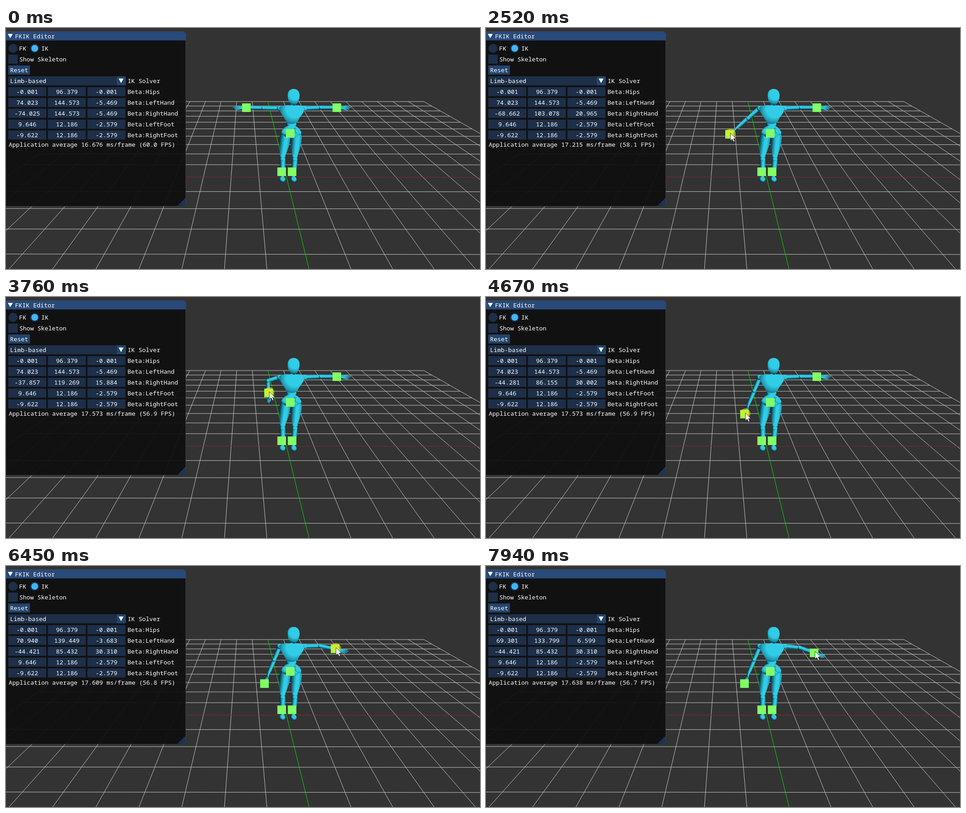
Recreate the animation shown at these times as an HTML page with a canvas. Size 1048x534 px, loop 8 s.

```html
<!DOCTYPE html>
<html lang="en">
<head>
<meta charset="utf-8">
<title>FKIK Editor</title>
<style>
  html, body { margin: 0; width: 100%; height: 100%; overflow: hidden; background: #333; }
  canvas { display: block; }
</style>
</head>
<body>
<canvas id="stage" width="1048" height="534"></canvas>
<script>
const ctx = document.getElementById('stage').getContext('2d');
const LOOP = 8000, STEP = 70, PHASE = 50;
const GREEN = '#80ff66', FIELD = '#1d2f49', BUTTON = '#23456d';
const LIT = '#31cde6', MID = '#1c93aa', DARK = '#06262e';

// Each hand rests, then eases from pose to pose; sag bows the path downwards
const RIGHT = {
  rest: [-74.025, 144.573, -5.469],
  grabbed: [1850, 4950],
  moves: [
    { start: 1850, end: 2500, pose: [-68.662, 103.078, 20.965], sag: 0 },
    { start: 2570, end: 3760, pose: [-37.857, 119.269, 15.884], sag: 13 },
    { start: 3830, end: 4750, pose: [-44.421, 85.432, 30.31], sag: 0 }
  ]
};
const LEFT = {
  rest: [74.023, 144.573, -5.469],
  grabbed: [6150, 7870],
  moves: [
    { start: 6150, end: 7190, pose: [55.586, 126.994, 5.214], sag: 3 },
    { start: 7260, end: 7870, pose: [69.301, 133.799, 6.599], sag: 0 }
  ]
};

const clamp = u => Math.min(1, Math.max(0, u));
const progress = (t, start, end) => clamp((t - start) / (end - start));
const ease = u => u * u * (3 - 2 * u);
const mix = (a, b, u) => a.map((v, i) => v + (b[i] - v) * u);
const project = ([x, y, z]) => [631.5 + 1.355 * x, 378.3 - 1.394 * y + 0.058 * z];

function handAt(hand, t) {
  return hand.moves.reduce((from, { start, end, pose, sag }) => {
    const u = progress(t, start, end);
    const value = mix(from, pose, ease(u));
    value[1] -= sag * Math.sin(Math.PI * u);
    return value;
  }, hand.rest);
}

// Frame time creeps up, with one short slowdown
const frameTime = t => 16.676 + 0.897 * clamp(t / 3760) ** 1.25
  + 1.04 * Math.exp(-(((t - 7190) / 420) ** 2));

function line(x0, y0, x1, y1, color) {
  ctx.strokeStyle = color;
  ctx.lineWidth = 1;
  ctx.beginPath();
  ctx.moveTo(x0, y0);
  ctx.lineTo(x1, y1);
  ctx.stroke();
}

function rect(x, y, w, h, color) {
  ctx.fillStyle = color;
  ctx.fillRect(x, y, w, h);
}

function polygon(color, ...points) {
  ctx.fillStyle = color;
  ctx.beginPath();
  points.forEach(([x, y]) => ctx.lineTo(x, y));
  ctx.closePath();
  ctx.fill();
}

function disc(x, y, r, color) {
  ctx.fillStyle = color;
  ctx.beginPath();
  ctx.arc(x, y, r, 0, 7);
  ctx.fill();
}

function text(value, x, y, align = 'left') {
  ctx.font = '13.35px "Noto Sans Mono", monospace';
  ctx.textAlign = align;
  ctx.fillStyle = '#fff';
  ctx.fillText(value, x, y + 4.5);
}

function drawGrid() {
  const far = 163, near = 534, white = '#c9c9c9';
  const columnX = (k, y) => {
    const top = 579 + 34.5 * k, bottom = 670 + 93 * k - 0.25 * k * k;
    return top + (bottom - top) * (y - far) / (near - far);
  };
  const rowY = n => 5020 / (13.02 - n) - 55.1;
  const column = (k, color) => line(columnX(k, far), far, columnX(k, near), near, color);
  const row = (n, color) => {
    const y = rowY(n), tilt = (y - far) / 400;
    line(columnX(-10, y), y - tilt, columnX(10, y), y + tilt, color);
  };
  for (let k = -10; k <= 10; k++) if (k) column(k, white);
  for (let n = -10; n <= 4; n++) if (n) row(n, white);
  row(0, '#802a2a');
  column(0, '#00e800');
}

function solid(path, x, y, r) {
  const g = ctx.createRadialGradient(x, y, 0, x, y, r);
  g.addColorStop(0, LIT);
  g.addColorStop(0.45, LIT);
  g.addColorStop(0.75, MID);
  g.addColorStop(1, DARK);
  ctx.fillStyle = g;
  ctx.fill(path);
}

function ball(x, y, rx, ry = rx, tilt = 0) {
  const path = new Path2D();
  path.ellipse(x, y, rx, ry, tilt, 0, 7);
  solid(path, x + rx * 0.3, y - ry * 0.35, Math.max(rx, ry) * 1.35);
}

// Tapered segment, lit from the upper right
function limb([x0, y0], [x1, y1], r0, r1) {
  const angle = Math.atan2(y1 - y0, x1 - x0), length = Math.hypot(x1 - x0, y1 - y0);
  const lit = Math.max(r0, r1) * (0.55 * Math.sin(angle) + 0.83 * Math.cos(angle) >= 0 ? -1 : 1);
  ctx.save();
  ctx.translate(x0, y0);
  ctx.rotate(angle);
  const g = ctx.createLinearGradient(0, lit, 0, -lit);
  g.addColorStop(0, MID);
  g.addColorStop(0.25, LIT);
  g.addColorStop(0.5, LIT);
  g.addColorStop(0.7, MID);
  g.addColorStop(1, DARK);
  ctx.fillStyle = g;
  ctx.beginPath();
  ctx.arc(0, 0, r0, Math.PI / 2, Math.PI * 1.5);
  ctx.quadraticCurveTo(length * 0.4, -r0 * 1.1, length, -r1);
  ctx.arc(length, 0, r1, -Math.PI / 2, Math.PI / 2);
  ctx.quadraticCurveTo(length * 0.4, r0 * 1.1, 0, r0);
  ctx.fill();
  ctx.restore();
}

function drawHand([x, y], angle, length, side) {
  const at = (d, a) => [x + d * Math.cos(angle + a * side), y + d * Math.sin(angle + a * side)];
  limb([x, y], at(length * 0.5, 0), 2.6, 2.8);
  for (let finger = -1; finger <= 2; finger++) {
    const spread = 0.12 * finger;
    limb(at(length * 0.35, spread), at(length * (1 - 0.1 * Math.abs(finger)), spread), 1.5, 0.7);
  }
}

// Two bones; the bend grows as the hand comes nearer
function drawArm(shoulder, value, side) {
  const bone = 36.5, target = project(value), depth = Math.max(value[2], 0);
  const dx = target[0] - shoulder[0], dy = target[1] - shoulder[1], distance = Math.hypot(dx, dy);
  const reach = Math.min(distance, 73 - depth * 0.25);
  const ux = dx / distance, uy = dy / distance;
  const slack = 1 - (distance / (2 * bone)) ** 2;
  const bend = Math.max(slack, 0) * bone * 0.7 * side;
  const elbow = [shoulder[0] + ux * reach / 2 + uy * bend, shoulder[1] + uy * reach / 2 - ux * bend];
  const wrist = [shoulder[0] + ux * reach, shoulder[1] + uy * reach];
  limb(shoulder, elbow, 5, 3.8);
  limb(elbow, wrist, 4.6, 2.6);
  ball(...elbow, 3.8);
  drawHand(wrist, Math.atan2(wrist[1] - elbow[1], wrist[0] - elbow[0]), 30 - depth * 0.5, side);
  ball(...shoulder, 6);
}

function drawLeg(side) {
  const hip = [629.5 + 12.5 * side, 242], knee = [625 + 13.5 * side, 284], ankle = [623.5 + 12 * side, 328];
  limb([knee[0], 291], ankle, 6, 3.8);
  ball(623.5 + 12.5 * side, 335.5, 6.5);
  limb(hip, knee, 12, 5);
  ball(...knee, 6.5, 5);
  ball(knee[0], 291, 5.5, 4);
}

function drawFigure(left, right) {
  drawArm([605, 178], right, -1);
  drawArm([660, 178], left, 1);
  [-1, 1].forEach(drawLeg);
  ball(631, 213, 11, 8);
  ball(630.5, 230, 20, 14);
  [-1, 1].forEach(side => ball(630.5 + 14 * side, 229, 10, 6, 0.7 * side));
  limb([635, 165], [634, 174], 6, 7);
  solid(new Path2D('M604 177C608 169 621 172 632 171C645 172 656 169 661 177'
    + 'C659 190 649 196 644 209Q632 216 620 209C616 197 606 190 604 177Z'), 638, 180, 40);
  solid(new Path2D('M636 135C646 135 650 143 649 152C648 162 643 169 638 172'
    + 'C626 171 623 158 623 151C622 141 627 135 636 135Z'), 639, 147, 26);
}

function drawHandles(left, right) {
  [[628, 233.5], [609.5, 318], [632.5, 318], project(right), project(left)].forEach(([x, y]) =>
    rect(Math.round(x - 9.5), Math.round(y - 9.5), 19, 19, GREEN));
}

function drawPanel(left, right, ms) {
  ctx.beginPath();
  ctx.roundRect(-8, 8, 405.5, 387, 6);
  ctx.fillStyle = 'rgba(15,15,15,.94)';
  ctx.fill();
  ctx.strokeStyle = 'rgba(110,110,128,.4)';
  ctx.lineWidth = 1;
  ctx.stroke();
  ctx.beginPath();
  ctx.roundRect(-8, 8, 405.5, 19.5, [6, 6, 0, 0]);
  ctx.fillStyle = '#294a7a';
  ctx.fill();
  polygon('#fff', [4, 13], [15, 13], [9.5, 22.5]);
  text('FKIK Editor', 20, 18);
  polygon('#1c3453', [397, 376], [397, 394], [379, 394]);

  disc(15.5, 45, 10, FIELD);
  text('FK', 29, 45);
  disc(63.5, 45, 10, FIELD);
  disc(63.5, 45, 7.5, '#42b4fb');
  text('IK', 78, 45);
  rect(5, 59, 21, 20, FIELD);
  text('Show Skeleton', 29.5, 69);
  rect(5, 83, 48, 20, BUTTON);
  text('Reset', 9, 93);
  rect(5, 107, 240, 20, FIELD);
  rect(245, 107, 20, 20, BUTTON);
  polygon('#fff', [249, 112], [260, 112], [254.5, 122]);
  text('Limb-based', 9, 117);
  text('IK Solver', 269, 117);

  const rows = {
    Hips: [-0.001, 96.379, -0.001],
    LeftHand: left,
    RightHand: right,
    LeftFoot: [9.646, 12.186, -2.579],
    RightFoot: [-9.622, 12.186, -2.579]
  };
  Object.entries(rows).forEach(([name, values], i) => {
    const y = 141 + 24 * i;
    values.forEach((value, c) => {
      rect(5 + 87.5 * c, y - 10, 84, 20, FIELD);
      text(value.toFixed(3), 47 + 87.5 * c, y, 'center');
    });
    text('Beta:' + name, 268.5, y);
  });
  text(`Application average ${ms.toFixed(3)} ms/frame (${(1000 / ms).toFixed(1)} FPS)`, 6, 258);
}

// The pointer enters, follows the right hand, then crosses in an arc to the left hand
function drawCursor(t, left, right) {
  if (t < 220) return;
  const enter = ease(progress(t, 220, 1250)), cross = progress(t, 4950, 5650);
  const onRight = mix([832, 426], project(right), enter);
  let [x, y] = mix(onRight, project(left), ease(cross));
  x += 2;
  y -= 3 + 25 * Math.sin(Math.PI * cross);
  const dragging = [RIGHT, LEFT].some(({ grabbed: [start, end] }) => t >= start && t < end);
  if (dragging) disc(x, y + 1, 11, 'rgba(255,230,0,.55)');
  const arrow = new Path2D('M0 0V17L4 13.5L7 19.5L9.5 18.5L7 12.5L12 12Z');
  ctx.save();
  ctx.translate(x, y);
  ctx.fillStyle = '#fff';
  ctx.fill(arrow);
  ctx.strokeStyle = '#111';
  ctx.lineWidth = 0.8;
  ctx.stroke(arrow);
  ctx.restore();
}

function draw(now) {
  const t = Math.max(0, Math.floor((now % LOOP - PHASE) / STEP) * STEP + PHASE);
  const left = handAt(LEFT, t), right = handAt(RIGHT, t);
  rect(0, 0, 1048, 534, '#333');
  drawGrid();
  drawFigure(left, right);
  drawHandles(left, right);
  drawPanel(left, right, frameTime(t));
  drawCursor(t, left, right);
}

const start = performance.now();
function tick() {
  draw(performance.now() - start);
  requestAnimationFrame(tick);
}
tick();
</script>
</body>
</html>
```
